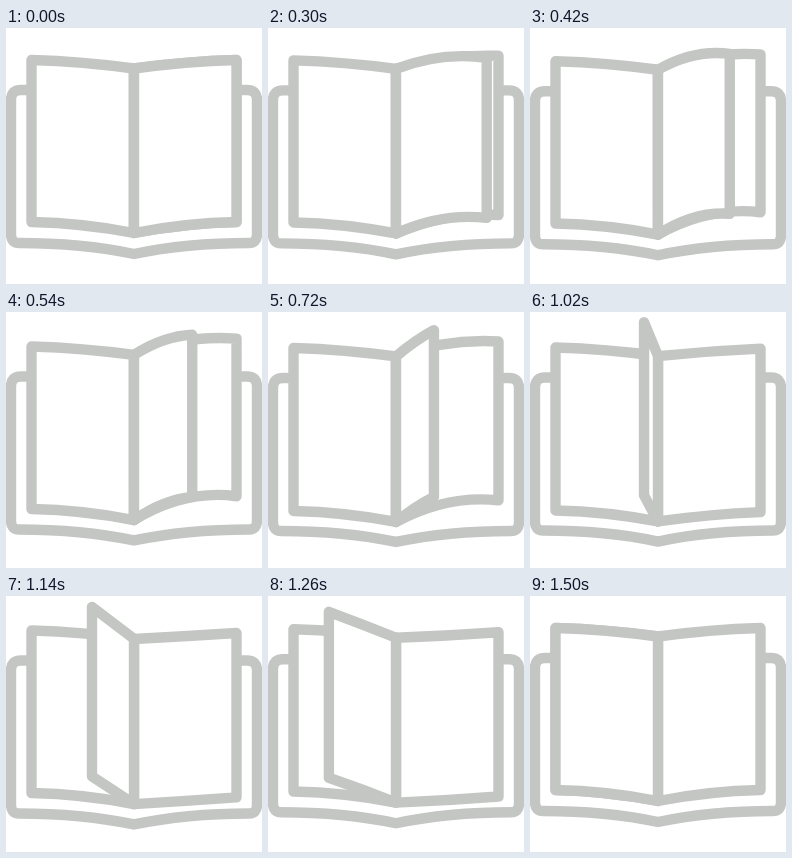
Write an HTML page that moves like this. It is 256 px wide and 256 px high and loops after 1.68 s.

```html
<!DOCTYPE html>
<html lang="en">
<head>
<meta charset="utf-8">
<title>Book loader</title>
<style>
html, body { margin: 0; width: 100%; height: 100%; overflow: hidden; background: #fff; }
svg { display: block; width: 100vw; height: 100vh; }
path { fill: #fff; stroke: #c4c6c4; stroke-width: 10.4; stroke-linejoin: round; stroke-linecap: round; }
</style>
</head>
<body>
<svg viewBox="0 0 256 256">
  <path id="cover" d="M25 62H15Q5 62 5 72V206Q5 215 13 215Q76 215 128 226Q180 215 243 215Q251 215 251 206V72Q251 62 241 62H231"/>
  <path id="left"/>
  <path id="right"/>
  <path id="leaf"/>
</svg>
<script>
const LOOP = 1680, STEP = 60, BEGIN = 180, END = 1500;
const SPINE = 128, WIDTH = 102.5;

// Time and reach of the turning leaf: 1 is flat right, -1 flat left.
const turn = [[BEGIN, 1], [420, .7], [720, .37], [900, .12], [1140, -.41], [1260, -.655], [END, -1]];

function slope(i) {
  const a = turn[i - 1], b = turn[i + 1];
  return a && b ? (b[1] - a[1]) / (b[0] - a[0]) : 0;
}

// Smooth curve through the turn's points, at rest at both ends.
function reachAt(t) {
  let i = 0;
  while (i < turn.length - 2 && t > turn[i + 1][0]) i++;
  const [t0, a] = turn[i], [t1, b] = turn[i + 1];
  const h = t1 - t0, u = (t - t0) / h, w = 1 - u;
  return a * (1 + 2 * u) * w * w + b * u * u * (3 - 2 * u)
    + h * u * w * (slope(i) * w - slope(i + 1) * u);
}

const el = id => document.getElementById(id);

function draw(now) {
  const step = Math.floor(now % LOOP / STEP) * STEP;
  const t = Math.min(END, Math.max(BEGIN, step));
  const c = reachAt(t);
  const swing = Math.sin(Math.PI * (t - BEGIN) / (END - BEGIN));
  const sink = 4.3 * swing ** 2;
  const low = 1.25 * sink;

  // Bows are how far a curve's control point rises above its chord.
  function page(id, reach, top, bottom, bowTop, bowBottom) {
    const x = SPINE + WIDTH * reach, mid = (SPINE + x) / 2;
    const y0 = 40.5 + sink, y1 = 205 + low;
    el(id).setAttribute("d", `M${SPINE} ${y0}Q${mid} ${(y0 + top) / 2 - bowTop} ${x} ${top}V${bottom}` +
      `Q${mid} ${(y1 + bottom) / 2 - bowBottom} ${SPINE} ${y1}Z`);
  }

  el("cover").setAttribute("transform", `translate(0 ${sink})`);
  page("left", -1, 32 + sink, 194 + low, 2.75, 4.5);

  // The page beneath billows up behind the leaf, then sags.
  const puff = swing * c * (c > 0 ? 26 : 12);
  page("right", 1, 32 + sink - .7 * puff, 194 + low - 1.15 * puff,
    2.75 + .85 * puff, 4.5 + 1.3 * puff);

  // The leaf rises towards the viewer and curls while on the right.
  const up = 1 - c * c;
  const curl = c > 0 ? 68 * c ** 3 * up : 0;
  page("leaf", c, 32 - up * (20.5 - 12 * c), 194 + low - up * (13 + 13 * Math.abs(c) - 4 * c),
    2.75 * c ** 4 + curl, 4.5 * c ** 4 + curl);
}

const start = performance.now();
function tick() {
  draw(performance.now() - start);
  requestAnimationFrame(tick);
}
tick();
</script>
</body>
</html>
```
